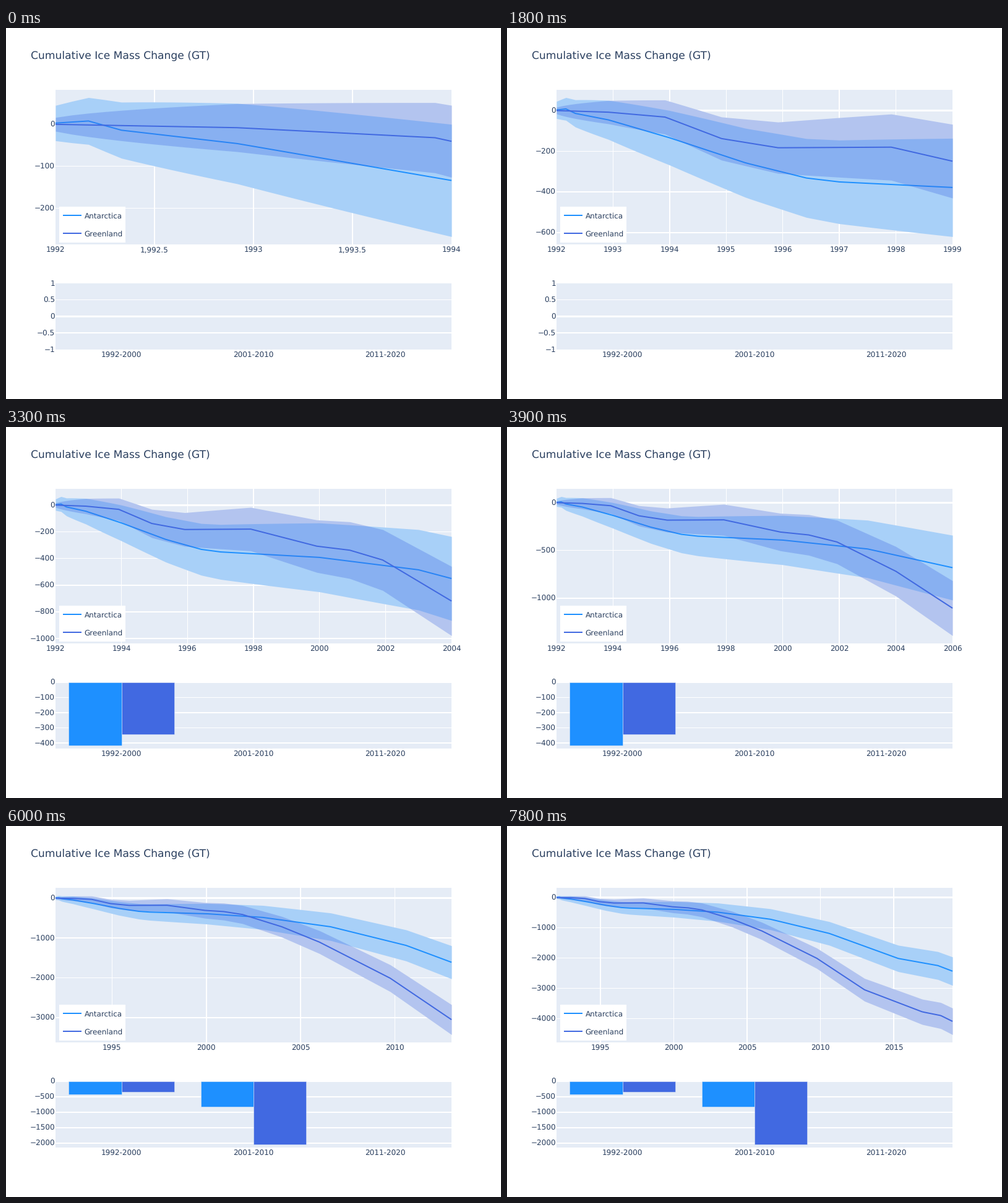
Write a matplotlib script that moves like this. It is 800 px wide and 600 px high and loops after 8 s.

```python
import math

import matplotlib.pyplot as plt
import numpy as np
from matplotlib.animation import FuncAnimation
from matplotlib.patches import Rectangle

WIDTH, HEIGHT, DPI = 800, 600, 100
PX = 72 / DPI
LEFT, RIGHT = 80, 720
TOP, BOTTOM = 100, 349.9
BAR_TOP, BAR_BOTTOM = 412.9, 520
INK, PAPER = "#2a3f5f", "#E5ECF6"
START = 1992
FRAME_MS, FRAMES, STEP = 100, 80, 3

plt.rcParams["text.hinting"] = "none"


# Straight trends between a few turning points; errors accumulate like a random walk.
def antarctica(t):
    turns = [0, 1 / 6, 1 / 3, 0.92, 2, 3.35, 4.42, 5, 8, 11, 14.6, 18.6, 23.3, 26, 27]
    mass = [3, 8, -14, -46, -134, -258, -332, -351, -392, -485, -720, -1188,
            -2015, -2250, -2435]
    return np.interp(t, turns, mass), 90 * np.sqrt(t + 0.22)


def greenland(t):
    turns = [0, 0.92, 1.92, 2.92, 3.92, 5.92, 7.92, 8.92, 9.92, 12, 14, 17.75,
             21, 24.94, 26.2, 27]
    mass = [0, -8, -32, -138, -183, -180, -308, -338, -412, -719, -1105, -2010,
            -3050, -3780, -3902, -4094]
    u = t + 0.09
    return np.interp(t, turns, mass), np.sqrt(u * (3000 + 260 * u - 4 * u * u))


SHEETS = [("Antarctica", "#1E90FF", antarctica), ("Greenland", "#4169E1", greenland)]

# Each decade: name, first year its bars show, loss of each sheet
PERIODS = [("1992-2000", 2001, (-414, -341)), ("2001-2010", 2011, (-814, -2033)),
           ("2011-2020", 2021, (0, 0))]

fig = plt.figure(figsize=(WIDTH / DPI, HEIGHT / DPI), dpi=DPI, facecolor="white")
ax = fig.add_axes((0, 0, 1, 1))


def rect(x0, y0, x1, y1, color, **style):
    style = {"lw": 0, "antialiased": False, **style}
    ax.add_patch(Rectangle((x0, y0), x1 - x0, y1 - y0, facecolor=color, **style))


def label(x, baseline, text, ha="center", size=12):
    ax.text(x, baseline, text, ha=ha, va="baseline", color=INK, zorder=6,
            fontsize=size * PX, family="DejaVu Sans")


def line(x, y, color, zorder):
    ax.plot(x, y, color=color, lw=2 * PX, solid_capstyle="butt", zorder=zorder)


def nice_step(rough):
    base = 10 ** math.floor(math.log10(rough))
    return base * next(m for m in (2, 5, 10) if rough / base < m)


def ticks(low, high, target):
    step = nice_step((high - low) / target)
    first, last = math.ceil(low / step - 1e-6), math.floor(high / step + 1e-6)
    return [k * step for k in range(first, last + 1)]


def crisp(pos, width):
    """Widen a line to every pixel it covers by at least a quarter."""
    return math.floor(pos - width / 2 + 0.25), math.ceil(pos + width / 2 - 0.25)


def y_axis(low, high, top, bottom, target):
    def to_px(value):
        return top + (high - value) / (high - low) * (bottom - top)

    for value in ticks(low, high, target):
        y = to_px(value)
        if value == 0 or top + 1 < y < bottom - 1:
            y0, y1 = crisp(y, 2 if value == 0 else 1)
            rect(LEFT, y0, RIGHT, y1, "white")
        label(79, y + 4.3, f"{value:g}".replace("-", "\u2212"), "right")
    return to_px


def draw_mass(year):
    rect(LEFT, TOP, RIGHT, 350, PAPER)
    span = year - START
    scale = (RIGHT - LEFT) / span

    for value in ticks(START, year, 9):
        x = LEFT + (value - START) * scale
        if LEFT + 1 < x < RIGHT - 1:
            x0, x1 = crisp(x, 1)
            rect(x0, TOP, x1, 350, "white")
        label(x, 363.3, f"{value:.0f}" if value == int(value) else f"{value:,.1f}")

    t = np.linspace(0, span, 12 * span + 1)
    curves = [model(t) for _, _, model in SHEETS]
    low = min((mid - error).min() for mid, error in curves)
    high = max((mid + error).max() for mid, error in curves)
    pad = (high - low) / 18
    to_y = y_axis(low - pad, high + pad, TOP, BOTTOM, 7.25)

    x = LEFT + t * scale
    for i, ((_, color, _), (mid, error)) in enumerate(zip(SHEETS, curves)):
        edges = to_y(mid + error), to_y(mid - error)
        ax.fill_between(x, *edges, color=PAPER, lw=0, zorder=1.5)
        line(x, to_y(mid), color, 2 + 0.2 * i)
        ax.fill_between(x, *edges, color=color, alpha=0.3, lw=0, zorder=2.1 + 0.2 * i)


def draw_legend():
    rect(86, 289, 193, 347, "white", zorder=4)
    for i, (name, color, _) in enumerate(SHEETS):
        y = 303 + 29 * i
        line([91.5, 121.5], [y, y], color, 5)
        label(126.5, y + 5, name, "left")


def draw_periods(year):
    rect(LEFT, 413, RIGHT, BAR_BOTTOM, PAPER)
    shown = [v for _, start, values in PERIODS if year >= start for v in values]
    low, high = (min(shown) / 0.95, 0) if shown else (-1, 1)
    to_y = y_axis(low, high, BAR_TOP, BAR_BOTTOM, 5)

    slot = (RIGHT - LEFT) / len(PERIODS)
    bar = slot * 0.4
    for i, (name, start, values) in enumerate(PERIODS):
        center = LEFT + (i + 0.5) * slot
        label(center, 533.3, name)
        if year < start:
            continue
        for x, value, (_, color, _) in zip((center - bar, center), values, SHEETS):
            rect(x, to_y(0), x + bar, to_y(value), color, ec=PAPER,
                 lw=0.5 * PX, antialiased=True, zorder=3)


def draw(frame):
    year = 1994 + max(0, frame // STEP - 1)
    ax.clear()
    ax.set(xlim=(0, WIDTH), ylim=(HEIGHT, 0))
    ax.axis("off")
    label(40, 50, "Cumulative Ice Mass Change (GT)", "left", 17.15)
    draw_mass(year)
    draw_legend()
    draw_periods(year)
    return []


anim = FuncAnimation(fig, draw, frames=FRAMES, interval=FRAME_MS,
                     repeat=True, repeat_delay=0, init_func=lambda: [])
plt.show()
```
